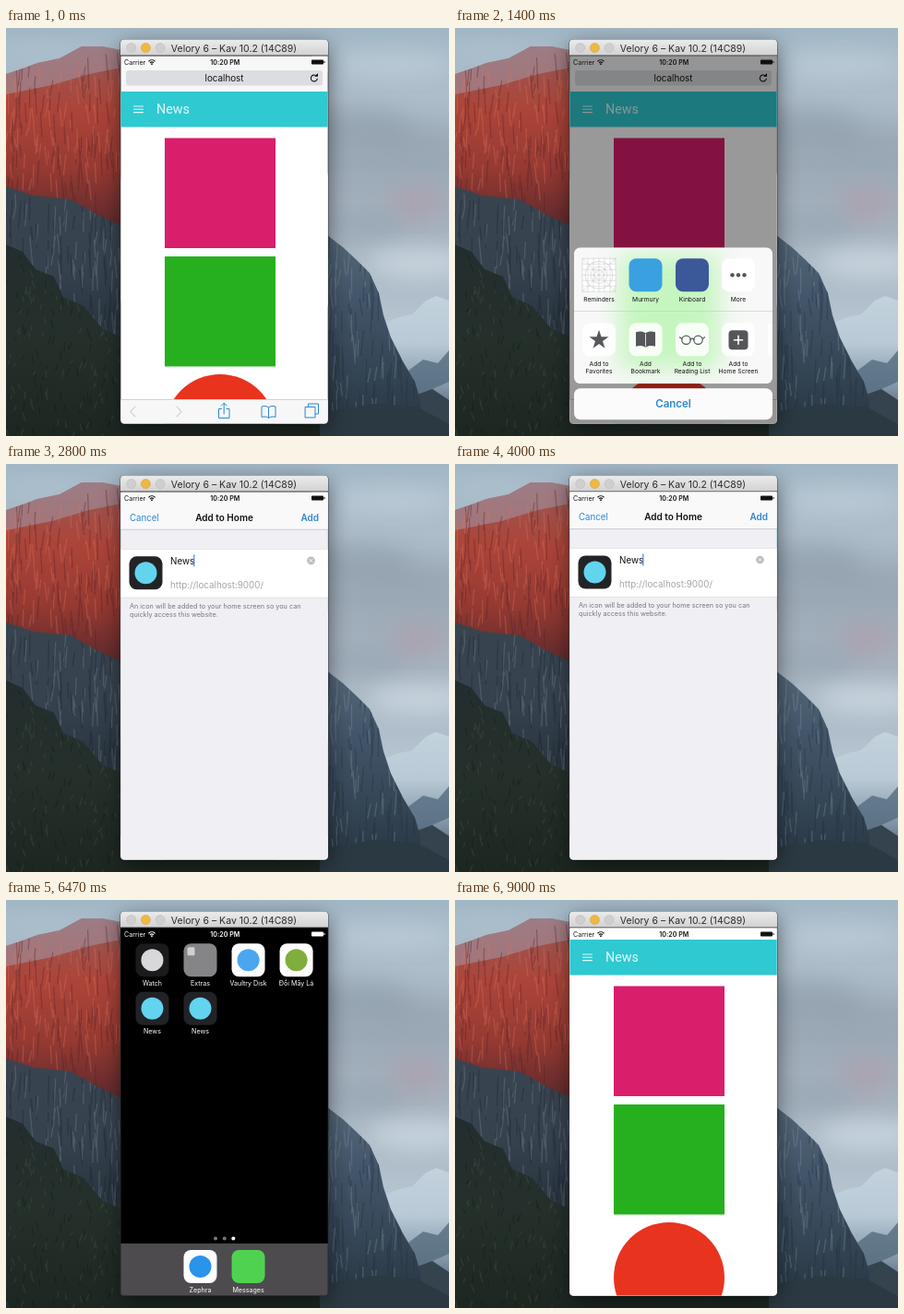
Write an HTML page that moves like this. It is 480 px wide and 443 px high and loops after 9.07 s.

```html
<!DOCTYPE html>
<html lang="en">
<head>
<meta charset="utf-8">
<title>Add to home screen</title>
<style>
html, body { margin: 0; width: 100%; height: 100%; overflow: hidden; background: #9fb0bd; }
svg { display: block; width: 100vw; height: 100vh; }
text { font-family: Inter, "Liberation Sans", sans-serif; white-space: pre; }
.line { fill: none; stroke-linecap: round; stroke-linejoin: round; }
</style>
</head>
<body>
<svg id="stage" viewBox="0 0 480 443"></svg>
<script>
const LOOP = 9070;
const BLUE = '#2c86d2', TEAL = '#2ec9d1';

// Markup helpers
const rect = (x, y, w, h, fill, r = 0, more = '') =>
  `<rect x="${x}" y="${y}" width="${w}" height="${h}" rx="${r}" fill="${fill}" ${more}/>`;
const circle = (x, y, r, fill, more = '') =>
  `<circle cx="${x}" cy="${y}" r="${r}" fill="${fill}" ${more}/>`;
const shape = (points, fill, more = '') => `<polygon points="${points}" fill="${fill}" ${more}/>`;
const line = (d, color, w = 1, more = '') =>
  `<path class="line" d="${d}" stroke="${color}" stroke-width="${w}" ${more}/>`;
const text = (x, y, size, str, fill = '#111', anchor = 'start', weight = 400, more = '') =>
  `<text x="${x}" y="${y}" font-size="${size}" fill="${fill}" text-anchor="${anchor}" font-weight="${weight}" ${more}>${str}</text>`;
const group = (id, body, more = '') => `<g id="${id}" ${more}>${body}</g>`;
const gradient = (id, ...stops) =>
  `<linearGradient id="${id}" x2="0" y2="1">${stops.map((c, i) =>
    `<stop offset="${i / (stops.length - 1)}" stop-color="${c}"/>`).join('')}</linearGradient>`;

let seed = 7;
const rand = (a, b) => {
  seed = (seed * 16807) % 2147483647;
  return a + (b - a) * seed / 2147483647;
};

// Rock texture: near-vertical strokes inside a box
function streaks(n, x0, y0, x1, y1, color, len, clip) {
  let d = '';
  for (let i = 0; i < n; i++)
    d += `M${rand(x0, x1).toFixed(1)} ${rand(y0, y1).toFixed(1)}l${rand(-3, 3).toFixed(1)} ${rand(len / 3, len).toFixed(1)}`;
  return line(d, color, 1.3, `opacity=".35" clip-path="url(#${clip})"`);
}

const RED = '0,50 18,44 34,38 58,33 82,20 104,20 130,25 130,217 100,203 70,186 30,182 0,172';
const WALL = '0,165 130,190 130,443 0,443';
const WOOD = '0,235 18,243 32,262 52,270 62,292 84,302 104,326 130,338 350,425 350,443 0,443';
const SLAB = '340,218 352,228 365,238 380,252 394,266 404,288 409,312 417,336 430,362 443,384 449,404 449,443 340,443';
const clip = (id, points) => `<clipPath id="${id}">${shape(points, '#000')}</clipPath>`;

const defs = `<defs>
  ${gradient('sky', '#a2b7c6', '#adbdc9', '#9ca9b6', '#a6b3bf', '#b0bfcb', '#c3d0da', '#b9c9d4')}
  ${gradient('redRock', '#96595a', '#ac4539', '#973a32', '#5d2a2d')}
  ${gradient('wallRock', '#38444f', '#36424e', '#25303a', '#1c262d')}
  ${gradient('wood', '#232d2e', '#25302b', '#1d2722')}
  ${gradient('slab', '#566979', '#43556a', '#354656', '#26343f')}
  ${gradient('snow', '#c3d2dd', '#b9cad6', '#7d92a4', '#34444f')}
  ${gradient('bar', '#ececec', '#d2d2d2')}
  <filter id="soft" x="-50%" y="-50%" width="200%" height="200%"><feGaussianBlur stdDeviation="12"/></filter>
  ${clip('red', RED)}${clip('wall', WALL)}${clip('woods', WOOD)}${clip('rock', SLAB)}
  <clipPath id="screen"><path d="M124.400 30.500h224.300v395a4 4 0 0 1-4 4h-216.300a4 4 0 0 1-4-4z"/></clipPath>
  <clipPath id="panel">${rect(129, 238, 215, 148, '#000', 7)}</clipPath>
  <clipPath id="view"><rect x="124" y="69" width="226" height="387"/></clipPath>
</defs>`;

const cloud = (x, y, rx, ry, fill, o) =>
  `<ellipse cx="${x}" cy="${y}" rx="${rx}" ry="${ry}" fill="${fill}" opacity="${o}" filter="url(#soft)"/>`;

const wallpaper = rect(0, 0, 480, 443, 'url(#sky)')
  + cloud(420, 40, 70, 14, '#c0cfda', .8) + cloud(380, 110, 60, 24, '#8795a4', .45)
  + cloud(450, 125, 50, 16, '#909eac', .5) + cloud(445, 190, 30, 20, '#b39aa6', .5)
  + cloud(390, 215, 45, 12, '#8d9cab', .5) + cloud(450, 255, 60, 16, '#cfdbe4', .8)
  + cloud(40, 25, 50, 8, '#b4c6d2', .7)
  + shape('406,322 425,314 440,311 455,296 466,291 480,296 480,443 420,443', 'url(#snow)')
  + shape('436,372 452,360 468,364 480,350 480,384 462,392 450,404', '#566d80', 'opacity=".8"')
  + shape('440,400 462,392 480,404 480,443 440,443', '#35434f')
  + shape(WALL, 'url(#wallRock)') + streaks(70, 0, 180, 130, 330, '#7b8994', 30, 'wall')
  + streaks(60, 0, 180, 130, 330, '#17212a', 34, 'wall')
  + shape(RED, 'url(#redRock)')
  + shape('0,50 18,44 34,38 58,33 82,20 104,20 130,25 130,42 90,50 50,62 0,72', '#a39aa8', 'opacity=".55"')
  + streaks(80, 0, 25, 130, 190, '#4d1f24', 34, 'red')
  + streaks(80, 0, 40, 130, 170, '#d9745a', 24, 'red')
  + shape(WOOD, 'url(#wood)') + streaks(90, 0, 240, 130, 443, '#4a5747', 8, 'woods')
  + streaks(90, 0, 240, 130, 443, '#10180f', 10, 'woods')
  + shape(SLAB, 'url(#slab)') + streaks(70, 340, 225, 450, 430, '#8294a2', 32, 'rock')
  + streaks(80, 340, 225, 450, 430, '#1f2c38', 38, 'rock')
  + shape('340,418 400,408 447,412 480,430 480,443 340,443', '#2b3942');

const windowFrame = rect(126, 20, 222, 414, '#000', 5, 'opacity=".55" filter="url(#soft)"')
  + rect(123.600, 12.500, 225.800, 417.500, '#303236', 4)
  + `<path d="M124 29.600V16.500a4 4 0 0 1 4-4H345a4 4 0 0 1 4 4V29.600z" fill="url(#bar)"/>`
  + ['#cfcfcf', '#efb843', '#cfcfcf'].map((c, i) =>
      circle(135.7 + 15.7 * i, 21.500, 5, c, `stroke="${i == 1 ? '#d9a136' : '#bdbdbd'}" stroke-width=".6"`)).join('')
  + text(247, 25.600, 10.5, 'Velory 6 – Kav 10.2 (14C89)', '#2b2b2b', 'middle');

// Shared page: header and three plain marks
const page = rect(124, 69, 226, 387, '#fff')
  + circle(232, 436, 60, '#e8331f')
  + rect(172, 119.5, 120, 119.5, '#d91e6c') + rect(172, 248, 120, 119.5, '#26b01e')
  + rect(124, 69, 226, 38.5, TEAL)
  + line('M138.5 85h10M138.5 88.3h10M138.5 91.6h10', '#e4f8f9', 1.1)
  + text(163, 93.3, 14.3, 'News', '#e4f8f9', 'start', 400, 'style="font-family:Roboto,sans-serif"');

const toolbar = rect(124, 403, 226, 27, '#f7f7f8') + rect(124, 403, 226, .6, '#b9b9bc')
  + line('M140 411l-5 5.5l5 5.5M185 411l5 5.5l-5 5.5', '#c6c8cc', 1.1)
  + line('M233.5 413.5h-3v10h11.500v-10h-3M236.200 419v-11.500M233.500 410l2.700-2.700l2.700 2.700', BLUE)
  + line('M284.500 412c-2-1.800-5-1.800-7.500-1v11.500c2.500-.8 5.500-.8 7.500 1c2-1.800 5-1.800 7.500-1v-11.500c-2.500-.8-5.500-.8-7.500 1v11.500', BLUE)
  + line('M327.500 411.500v-3.500h11v11h-3.500M324.500 411.500h10.500v11.500h-10.500z', BLUE);

const addressBar = rect(124, 30, 226, 39, '#f7f7f8') + rect(130, 46, 213, 16.500, '#dcdde0', 3)
  + text(236.5, 57.7, 9.8, 'localhost', '#111', 'middle')
  + line('M337.300 55.200a3.500 3.500 0 1 1-1.500-3.600', '#111', 1.1)
  + '<path d="M334.300 52.800h3.700v-3.700z" fill="#111"/>';

// Share sheet
const COLS = [156, 206.500, 257, 307];
const label = (x, y, ...rows) => rows.map((s, i) => text(x, y + 7.600 * i, 6.7, s, '#111', 'middle')).join('');
const tile = (x, y, fill, more) => rect(x - 18, y, 36, 36, fill, 8, more);

let grid = '';
for (let k = 0; k <= 36; k += 6) grid += `M${138 + k} 250v36M138 ${250 + k}h36`;
const star = Array.from({ length: 10 }, (_, i) => {
  const r = i % 2 ? 4.200 : 11, a = Math.PI * (i / 5 - .5);
  return `${(156 + r * Math.cos(a)).toFixed(1)},${(338.500 + r * Math.sin(a)).toFixed(1)}`;
}).join(' ');

const sheet = `<g clip-path="url(#panel)">${rect(129, 238, 215, 148, '#f7f8f7')}
    ${rect(178, 246, 108, 124, '#b9f5b2', 0, 'opacity=".8" filter="url(#soft)"')}</g>`
  + rect(129, 307, 215, .6, '#c4cac4')
  + tile(156, 250, '#fff') + line(grid, '#c4c4c8', .5)
  + [5, 9, 15].map(r => circle(156, 268, r, 'none', 'stroke="#bbb" stroke-width=".5"')).join('')
  + line('M138 250l36 36M174 250l-36 36', '#c4c4c8', .5)
  + tile(206.500, 250, '#3aa0e0') + tile(257, 250, '#3b5998') + tile(307, 250, '#fff')
  + [300.500, 307, 313.500].map(x => circle(x, 268, 2.200, '#55565a')).join('')
  + ['Reminders', 'Murmury', 'Kinboard', 'More'].map((s, i) => label(COLS[i], 296.500, s)).join('')
  + COLS.map(x => tile(x, 320, '#fff', 'opacity=".85"')).join('')
  + rect(339.500, 320, 4.500, 36, '#fff', 2)
  + shape(star, '#55565a')
  + '<path d="M206.500 331c-3-2-7-2-10.500-1v15.500c3.500-1 7.500-1 10.500 1c3-2 7-2 10.500-1v-15.500c-3.500-1-7.500-1-10.500 1z" fill="#55565a"/>'
  + line('M206.500 332v13', '#fff', .8)
  + line('M245.500 337l-2-1.500M268.500 337l2-1.500M255 338q2-2 4 0', '#55565a', 1.2)
  + [250.500, 263.500].map(x => circle(x, 338.500, 4.700, 'none', 'stroke="#55565a" stroke-width="1.2"')).join('')
  + rect(296.500, 328, 21, 21, '#55565a', 4) + line('M307 334v9M302.500 338.500h9', '#fff', 1.6)
  + [['Add to', 'Favorites'], ['Add', 'Bookmark'], ['Add to', 'Reading List'], ['Add to', 'Home Screen']]
      .map((s, i) => label(COLS[i], 366.700, ...s)).join('')
  + rect(129, 391, 215, 34, '#fbfbfb', 7)
  + text(236.500, 412, 11.500, 'Cancel', BLUE, 'middle', 600);

// Home screen icon holding one plain circle
const appIcon = (x, y, fill, dot) => tile(x, y, fill) + (dot ? circle(x, y + 18, 12, dot) : '');

const modal = rect(124, 30, 226, 400, '#efeff4') + rect(124, 30, 226, 40, '#f9f9fa')
  + rect(124, 70, 226, .6, '#b5b5ba')
  + text(134, 61, 9.700, 'Cancel', BLUE) + text(236.500, 61, 10, 'Add to Home', '#111', 'middle', 600)
  + text(339, 61, 10, 'Add', BLUE, 'end', 600, 'id="add"')
  + rect(124, 91.500, 226, 52.500, '#fff') + rect(124, 91.500, 226, .5, '#d5d5da') + rect(124, 144, 226, .5, '#d5d5da')
  + appIcon(151.500, 99.500, '#222326', '#62d4ee')
  + text(178, 108, 9.800, 'News') + text(178, 134, 9.800, 'http://localhost:9000/', '#a5a5aa')
  + group('editing', rect(203.300, 97.500, 1.100, 13, '#3f6fe0') + circle(330.500, 104, 4.300, '#bcbcc1')
      + line('M329 102.500l3 3M332 102.500l-3 3', '#fff', .9))
  + text(134, 156, 7.250, 'An icon will be added to your home screen so you can', '#77777c')
  + text(134, 165, 7.250, 'quickly access this website.', '#77777c');

const homeLabel = (x, y, s) => text(x, y, 7.100, s, '#fff', 'middle');
const HOME = [158.500, 210.500, 262.500, 314.500];
const home = appIcon(HOME[0], 47.500, '#1b1b1d', '#d8d8da') + appIcon(HOME[1], 47.500, '#858587')
  + rect(196.500, 51.500, 8, 9, '#d0d0d2', 1.500)
  + appIcon(HOME[2], 47.500, '#fff', '#4ba6f0') + appIcon(HOME[3], 47.500, '#fff', '#7fae3c')
  + ['Watch', 'Extras', 'Vaultry Disk', 'Đồi Mây Lá'].map((s, i) => homeLabel(HOME[i], 93, s)).join('')
  + [0, 1].map(i => appIcon(HOME[i], 100, '#222326', '#62d4ee') + homeLabel(HOME[i], 145.500, 'News')).join('')
  + [227, 236.700, 246.300].map((x, i) => circle(x, 367.500, 2, i == 2 ? '#fff' : '#777')).join('')
  + rect(124, 373, 226, 57, '#4d4b4e')
  + appIcon(HOME[1], 380, '#fff', '#2a93ea') + appIcon(HOME[2], 380, '#4fd24f')
  + homeLabel(HOME[1], 426, 'Zephra') + homeLabel(HOME[2], 426, 'Messages');

const status = `<text x="128" y="39.700" font-size="7.100">Carrier</text>
  <text x="237.300" y="39.700" font-size="7.100" font-weight="600" text-anchor="middle">10:20 PM</text>
  <path class="line" d="M154.800 36a4.600 4.600 0 0 1 6.400 0M156.300 37.700a2.500 2.500 0 0 1 3.400 0" stroke="currentColor" stroke-width="1.1"/>
  <circle cx="158" cy="39.200" r=".9"/>
  <rect x="331" y="34.500" width="13" height="5" rx="1"/><rect x="344.500" y="36" width="1" height="2"/>`;

document.getElementById('stage').innerHTML = defs + wallpaper + windowFrame
  + `<g clip-path="url(#screen)">` + rect(124, 30, 226, 400, '#000')
  + group('home', home)
  + group('browser', `<g clip-path="url(#view)">${page}</g>` + toolbar + addressBar
      + group('dim', rect(124, 30, 226, 400, '#000')) + group('sheet', sheet) + group('modal', modal))
  + group('launch', rect(124, 30, 226, 400, '#fff'))
  + group('app', rect(124, 30, 226, 400, '#fff') + `<g transform="translate(0 -26)">${page}</g>`)
  + group('status', status, 'fill="currentColor"')
  + '</g>';

const el = id => document.getElementById(id);
const show = (id, on) => el(id).style.display = on ? '' : 'none';
const move = (id, value) => el(id).setAttribute('transform', value);
const fade = (id, value) => el(id).setAttribute('opacity', value);

// Critically damped spring from 0 to 1, the system's motion curve
const spring = (t, start, speed = 18) => {
  const k = Math.max(0, t - start) / 1000 * speed;
  return k > 12 ? 1 : 1 - (1 + k) * Math.exp(-k);
};

// Zoom between an icon (p = 0) and the full screen (p = 1), carrying the home screen along
const ICON = .16;
function zoomApp(id, x, y, p) {
  const cx = x + (237 - x) * p, cy = y + (230 - y) * p, k = ICON + (1 - ICON) * p;
  move(id, `translate(${cx} ${cy}) scale(${k}) translate(-237 -230)`);
  fade(id, Math.min(1, 3 * p));
  show(id, p > 0);
  if (p > 0) move('home', `translate(${cx} ${cy}) scale(${k / ICON}) translate(${-x} ${-y})`);
}

function draw(t) {
  const sheetUp = spring(t, 900) - spring(t, 1950);
  const modalUp = spring(t, 2200, 14) - spring(t, 5215, 14);
  const stay = 1 - spring(t, 5650, 14);
  const open = spring(t, 7150, 14);
  const editing = t > 2600 && t < 5200;

  fade('dim', .4 * sheetUp);
  move('sheet', `translate(0 ${200 * (1 - sheetUp)})`);
  move('modal', `translate(0 ${400 * (1 - modalUp)})`);
  show('editing', editing);
  fade('add', editing ? 1 : .4);

  move('home', '');
  zoomApp('browser', HOME[1], 398, stay);
  zoomApp('launch', HOME[1], 118, open);
  show('app', t >= 8400);
  el('status').style.color = stay < .5 && open < .5 ? '#fff' : '#111';
}

const start = performance.now();
function tick() {
  draw((performance.now() - start) % LOOP);
  requestAnimationFrame(tick);
}
tick();
</script>
</body>
</html>
```
